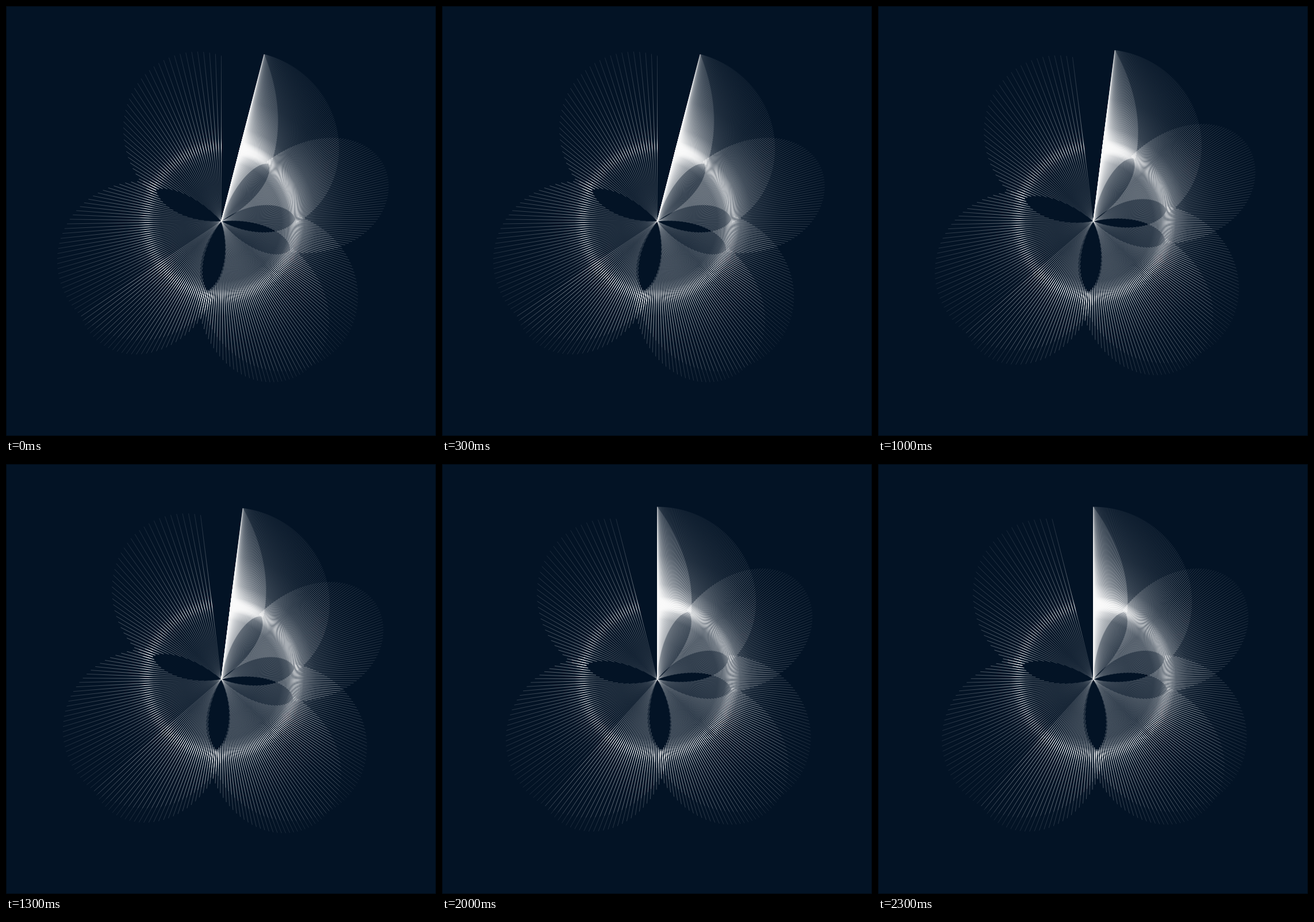
Write an HTML page with a canvas that moves like this. It is 748x748 px and loops after 2500 ms.

```html
<!DOCTYPE html>
<html lang="en">
<head>
<meta charset="utf-8">
<title>Chirped spokes</title>
<style>
  html, body { margin: 0; width: 100%; height: 100%; overflow: hidden; background: #031325; }
  canvas { display: block; }
</style>
</head>
<body>
<canvas id="stage" width="748" height="748"></canvas>
<script>
const ctx = document.getElementById('stage').getContext('2d');
const SIZE = 748, CX = 374.5, CY = 374.5;
const RING = 130, REACH = 300;
const STEPS = 5, HOLD = 500, TURN = 3.6;
const SWEEP = 345.6, COUNT = 346;
const RAD = Math.PI / 180;
const RING_PHASE = Math.acos(RING / REACH);

// Angles in degrees from the leading edge.
// from/to: where the lobe meets the ring, peak: longest spoke,
// inA/inB: angular width of the inner hollow at either end.
const shortFan = [
  { from: -30, peak: 0, to: 27, inA: 20, inB: 25, bend: 0.5 },
  { from: 23, peak: 59, to: 100, inA: 26, inB: 30 },
  { from: 96, peak: 140, to: 184, inA: 31, inB: 35 },
  { from: 171, peak: 214, to: 258, inA: 36, inB: 35 }
];
const longFan = [
  { from: -76, peak: 0, to: 77, inA: 37, inB: 38 },
  { from: 71, peak: 126, to: 182, inA: 32, inB: 34 },
  { from: 170, peak: 232, to: 287, inA: 33, inB: 34 },
  { from: 277, peak: 332, to: 386, inA: 26, inB: 34 }
];

const hollow = (gap, width) =>
  gap < width ? RING * Math.cos(gap / width * Math.PI / 2) : 0;

function span(lobe, a) {
  const edge = a < lobe.peak ? lobe.from : lobe.to;
  const u = Math.pow((a - lobe.peak) / (edge - lobe.peak), lobe.bend || 1);
  const inner = Math.max(hollow(a - lobe.from, lobe.inA), hollow(lobe.to - a, lobe.inB));
  return [inner, REACH * Math.cos(u * RING_PHASE)];
}

function glow() {
  const g = ctx.createRadialGradient(CX, CY, 0, CX, CY, REACH);
  const stops = [[0, 0.08], [20, 0.11], [65, 0.22], [105, 0.36], [118, 0.56],
                 [127, 1], [133, 1], [144, 0.56], [165, 0.36], [215, 0.21], [300, 0.09]];
  for (const [r, alpha] of stops) g.addColorStop(r / REACH, `rgba(250,250,250,${alpha})`);
  return g;
}
const ink = glow();

function spoke(angle, r0, r1) {
  const x = Math.sin(angle * RAD), y = -Math.cos(angle * RAD);
  ctx.beginPath();
  ctx.moveTo(CX + r0 * x, CY + r0 * y);
  ctx.lineTo(CX + r1 * x, CY + r1 * y);
  ctx.stroke();
}

function fan(lobes, count, lead) {
  for (let i = 0; i <= count; i++) {
    const a = SWEEP * (i / COUNT) ** 2;
    for (const lobe of lobes) {
      if (a >= lobe.from && a <= lobe.to) spoke(lead + a, ...span(lobe, a));
    }
  }
}

function draw(step) {
  const lead = (STEPS - 1 - step) * TURN;
  ctx.fillStyle = '#031325';
  ctx.fillRect(0, 0, SIZE, SIZE);
  ctx.strokeStyle = ink;
  ctx.lineWidth = 1;
  fan(shortFan, 277, lead);
  fan(longFan, COUNT, lead);
  ctx.strokeStyle = 'rgba(0,0,0,0.55)';
  ctx.strokeRect(0.5, 0.5, SIZE - 1, SIZE - 1);
}

const start = performance.now();
let shown = -1;
function tick() {
  const step = Math.floor((performance.now() - start) / HOLD) % STEPS;
  if (step !== shown) draw(shown = step);
  requestAnimationFrame(tick);
}
tick();
</script>
</body>
</html>
```
